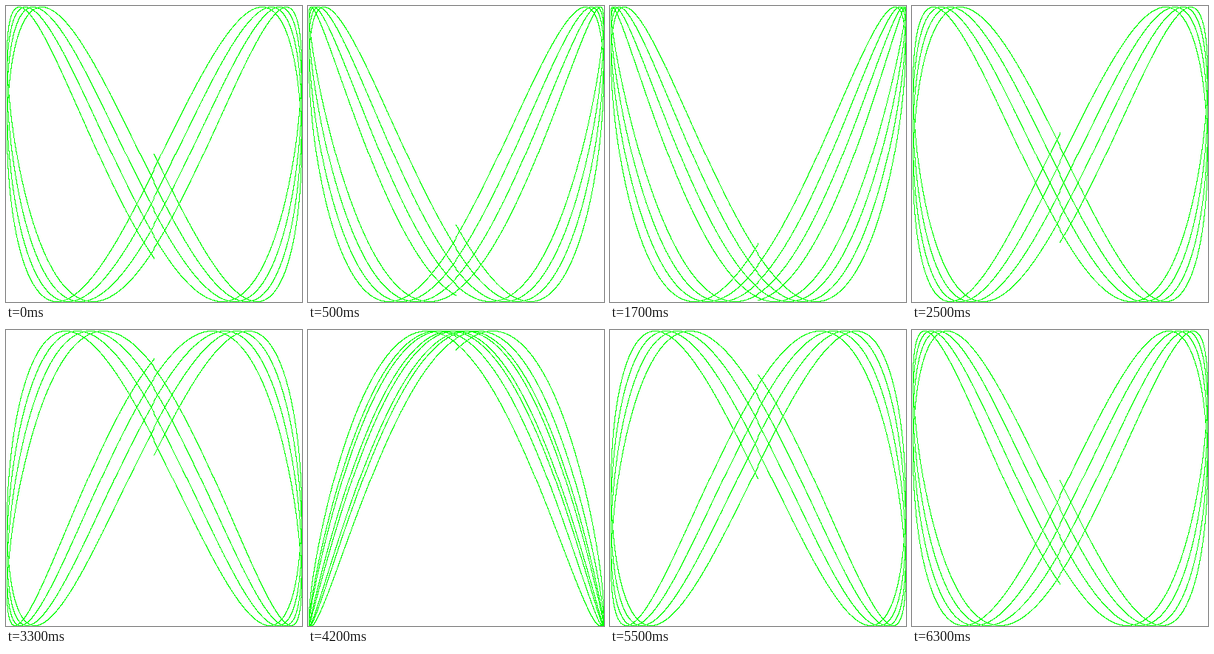
An HTML page with a canvas for the animation above (6.4 s loop, 401x401 px).

```html
<!DOCTYPE html>
<html lang="en">
<head>
<meta charset="utf-8">
<title>Lissajous</title>
<style>
  html, body { margin: 0; width: 100%; height: 100%; overflow: hidden; background: #fff; }
  canvas { display: block; width: 401px; height: 401px; image-rendering: pixelated; }
</style>
</head>
<body>
<canvas id="stage" width="401" height="401"></canvas>
<script>
const SIZE = 200;
const SIDE = 2 * SIZE + 1;
const CYCLES = 4;
const RES = 0.001;
const FREQ = 2.0315;
const STEPS = 64;
const DELAY = 100;
const PHASE_STEP = 0.1;

const ctx = document.getElementById('stage').getContext('2d');
const image = ctx.createImageData(SIDE, SIDE);
const pixels = new Uint32Array(image.data.buffer);
const WHITE = 0xffffffff;
const GREEN = 0xff00ff00;

// Truncating toward zero gives the small break along both centre axes.
const toPixel = v => SIZE + Math.trunc(v * SIZE + 0.5);

function draw(phase) {
  pixels.fill(WHITE);
  for (let t = 0; t < CYCLES * 2 * Math.PI; t += RES) {
    const x = toPixel(Math.sin(t));
    const y = toPixel(Math.sin(t * FREQ + phase));
    pixels[y * SIDE + x] = GREEN;
  }
  ctx.putImageData(image, 0, 0);
}

const start = performance.now();
let shown = -1;

function tick() {
  const step = Math.floor((performance.now() - start) / DELAY) % STEPS;
  if (step !== shown) {
    shown = step;
    draw(step * PHASE_STEP);
  }
  requestAnimationFrame(tick);
}
tick();
</script>
</body>
</html>
```
